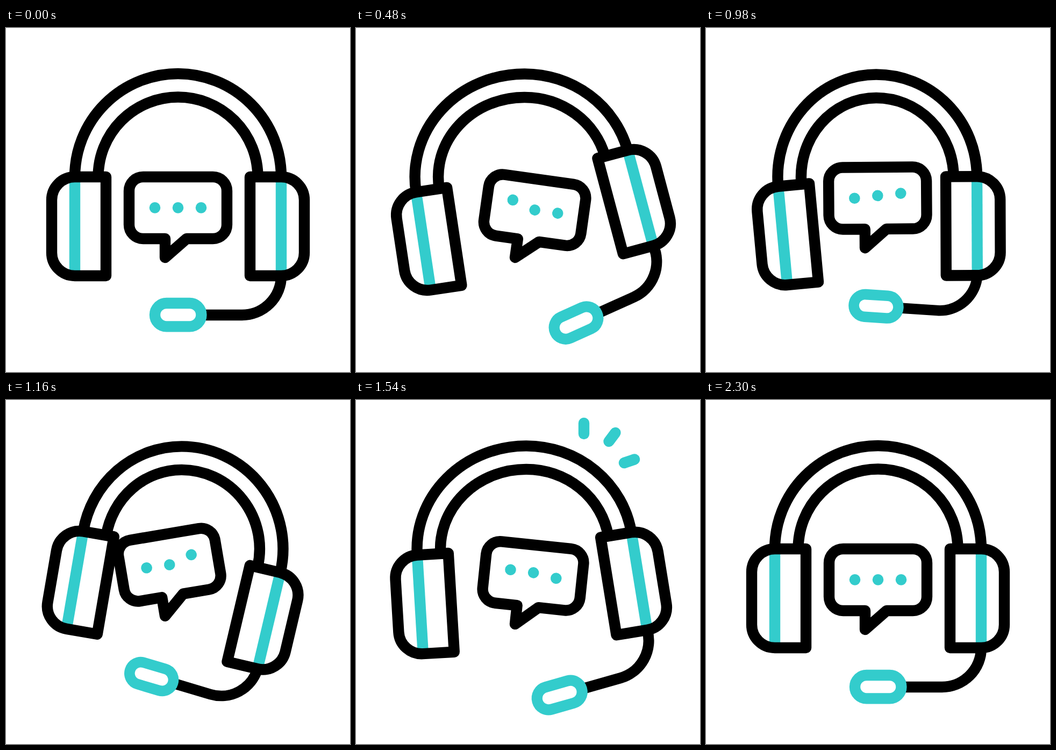
Write an HTML page that moves like this. It is 640x640 px and loops after 2400 ms.

```html
<!DOCTYPE html>
<html lang="en">
<head>
<meta charset="utf-8">
<title>Headset</title>
<style>
  html, body { margin: 0; width: 100%; height: 100%; overflow: hidden; background: #fff; }
  svg { display: block; width: 100vw; height: 100vh; }
  .ink, .teal { fill: none; stroke: #000; stroke-width: 20.4; stroke-linejoin: round; }
  .teal { stroke: #3cc; }
  .dots { fill: #3cc; }
  .sparks { stroke-linecap: round; }
</style>
</head>
<body>
<svg viewBox="0 0 640 640">
  <defs>
    <g id="cup">
      <path class="teal" d="M128 277V461"/>
      <path class="ink" d="M186 277H128A43 43 0 0 0 85 320V418A43 43 0 0 0 128 461H186Z"/>
    </g>
  </defs>
  <g class="ink">
    <path id="outer"/>
    <path id="inner"/>
  </g>
  <g id="mic">
    <path class="ink" d="M512 461A73 73 0 0 1 439 534H367"/>
    <rect class="teal" x="277" y="512" width="86.4" height="43.4" rx="21.7"/>
  </g>
  <use id="left" href="#cup"/>
  <g id="right"><use href="#cup" transform="translate(640) scale(-1 1)"/></g>
  <g id="bubble">
    <path class="ink" d="M296 392H255A26 26 0 0 1 229 366V303A26 26 0 0 1 255 277H385A26 26 0 0 1 411 303V366A26 26 0 0 1 385 392H336L296 427Z"/>
    <g class="dots">
      <circle cx="277" cy="334.4" r="10.3"/>
      <circle cx="320" cy="334.4" r="10.3"/>
      <circle cx="363" cy="334.4" r="10.3"/>
    </g>
  </g>
  <g class="teal sparks">
    <path d="M424 63V43"/>
    <path d="M470.5 77L482.5 61"/>
    <path d="M499 117L518 110.5"/>
  </g>
</svg>
<script>
const LOOP = 2400, CX = 320, CY = 277, RAD = Math.PI / 180;
const $ = id => document.getElementById(id);
const dots = document.querySelectorAll('.dots circle');
const sparks = document.querySelectorAll('.sparks path');

const smooth = (t, a, b) => {
  const u = Math.min(1, Math.max(0, (t - a) / (b - a)));
  return u * u * (3 - 2 * u);
};

// Up and down again, resting outside the span
const hop = (t, start, half) => smooth(t, start, start + half) - smooth(t, start + half, start + 2 * half);

// Leaves rest at 200 ms and eases from one [time, value] turning point to the next
function sway(t, ...turns) {
  let from = 200, value = 0;
  for (const [to, next] of turns) {
    if (t < to) return value + (next - value) * smooth(t, from, to);
    [from, value] = [to, next];
  }
  return value;
}

const move = (id, value) => $(id).setAttribute('transform', value);
const swing = side => `translate(${side.x}) rotate(${side.turn} ${CX} ${CY})`;

// Two elliptical quarters that meet at the crown
function band(id, r, left, right, squash) {
  const shift = 0.35 * left.x + 0.65 * right.x, top = CX + shift;
  const rl = r + shift - left.x, rr = r - shift + right.x, ry = r - 1.5 * squash;
  const a = left.turn * RAD, b = right.turn * RAD;
  $(id).setAttribute('d',
    `M${top - rl * Math.cos(a)} ${CY - ry * Math.sin(a)}A${rl} ${ry} 0 0 1 ${top} ${CY - ry}`
    + `A${rr} ${ry} 0 0 1 ${top + rr * Math.cos(b)} ${CY + ry * Math.sin(b)}`);
}

function drawHeadset(t) {
  const left = {
    x: sway(t, [540, -20], [1180, 13], [1540, -14.5], [1800, 0]),
    turn: sway(t, [760, -17], [1300, 15], [1600, -5.5], [1800, 0])
  };
  const right = {
    x: sway(t, [480, 0], [820, -14], [1260, 6], [1800, 0]),
    turn: sway(t, [600, -19], [700, -19], [1220, 14.5], [1580, -10], [1800, 0])
  };
  const bend = sway(t, [440, -9.5], [960, 4], [1100, 4], [1500, -7], [1800, 0]);
  const squash = hop(t, 200, 800);

  band('outer', 192, left, right, squash);
  band('inner', 148.5, left, right, squash);
  move('left', swing(left));
  move('right', swing(right));
  move('mic', `${swing(right)} translate(512 461) rotate(${bend}) scale(${1 - 0.04 * squash}) translate(-512 -461)`);
}

function drawBubble(t) {
  const tilt = sway(t, [700, 13.5], [1200, -10], [1700, 11], [2200, 0]);
  move('bubble', `translate(0 ${-25.5 * hop(t, 600, 600)}) rotate(${tilt} 296 427)`);
  dots.forEach((dot, i) => {
    const lift = hop(t, 200 + 300 * i, 300) + hop(t, 1100 + 300 * i, 300);
    dot.setAttribute('cy', 334.4 - 13 * lift);
  });
}

// Each stroke grows outward, then its tail follows
function drawSparks(t) {
  const head = smooth(t, 1340, 1520), tail = smooth(t, 1560, 1740);
  for (const spark of sparks) {
    const size = spark.getTotalLength();
    spark.style.display = head > tail ? '' : 'none';
    spark.style.strokeDasharray = `${size * (head - tail)} 99`;
    spark.style.strokeDashoffset = -size * tail;
  }
}

const begin = performance.now();
function tick() {
  const t = (performance.now() - begin) % LOOP;
  drawHeadset(t);
  drawBubble(t);
  drawSparks(t);
  requestAnimationFrame(tick);
}
tick();
</script>
</body>
</html>
```
